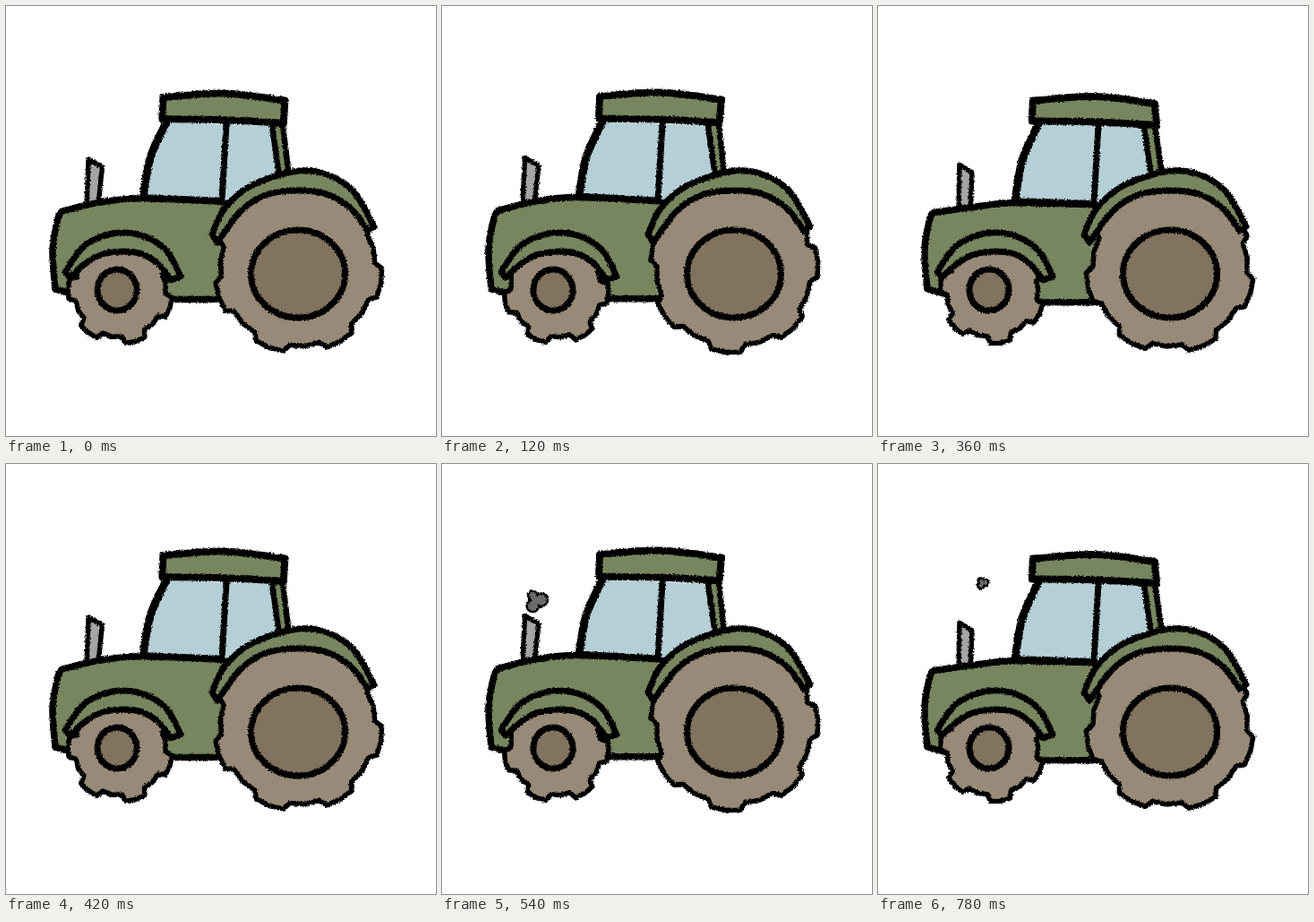
An HTML page for the animation above (0.84 s loop, 480 px wide and 480 px high).

```html
<!DOCTYPE html>
<html lang="en">
<head>
<meta charset="utf-8">
<title>Tractor</title>
<style>
  html, body { margin: 0; width: 100%; height: 100%; overflow: hidden; background: #fff; }
  svg { display: block; width: 100vw; height: 100vh; }
  path { stroke-linejoin: round; stroke-linecap: round; }
</style>
</head>
<body>
<svg viewBox="0 0 480 480">
  <filter id="rough" filterUnits="userSpaceOnUse" x="0" y="0" width="480" height="480" color-interpolation-filters="sRGB">
    <feTurbulence id="grain" type="fractalNoise" baseFrequency="0.55" numOctaves="2" seed="1"/>
    <feDisplacementMap in="SourceGraphic" scale="3.5" xChannelSelector="R" yChannelSelector="G"/>
  </filter>
  <g id="art" filter="url(#rough)"></g>
</svg>
<script>
const STEP = 60, STEPS = 14, POSES = 7, PUFF_START = 8;
const GREEN = '#78865f', GLASS = '#b6cfd7', TYRE = '#988a78', HUB = '#81735f', PIPE = '#a3a5a7', SMOKE = '#6a6a6a';

const shape = (d, fill = 'none', width = 7) =>
  `<path d="${d}" fill="${fill}" stroke="${width ? '#000' : 'none'}" stroke-width="${width}"/>`;
const disc = (x, y, rx, ry) => `M${x - rx},${y}a${rx},${ry} 0 1 0 ${2 * rx},0a${rx},${ry} 0 1 0 ${-2 * rx},0Z`;

// Smooth curve through points, continuing the current path.
function curve(pts) {
  let d = '' + pts[0];
  for (let i = 0; i < pts.length - 1; i++) {
    const p = pts[i - 1] || pts[i], a = pts[i], b = pts[i + 1], n = pts[i + 2] || b;
    d += `C${a[0] + (b[0] - p[0]) / 6},${a[1] + (b[1] - p[1]) / 6} ${b[0] - (n[0] - a[0]) / 6},${b[1] - (n[1] - a[1]) / 6} ${b}`;
  }
  return d;
}

// The body bounces once per wheel lug; `give` is how much a point follows it.
const bounce = pose => 2.5 - 6.5 * Math.cos((pose - 1.15) / POSES * 2 * Math.PI);

function body(bob) {
  const at = (x, y, give) => [x, y + bob * give];

  const lean = -bob * .4;
  const stack = shape(`M${at(90, 224, 1)}L${at(92 + lean / 2, 172, 1.1)}L${at(107 + lean, 180.5, 1.1)}L${at(103, 224, 1)}`, PIPE, 5.5);

  const hoodTop = [at(63, 229, .3), at(105, 220, 1), at(150, 215.5, .9), at(243, 219, .6)];
  const nose = [[55, 316], [52, 272], [58, 237], hoodTop[0]];
  const hood = shape(`M${curve(hoodTop)}L265,223L${at(265, 328, .6)}L${at(190, 328, .6)}L74,321L${curve(nose)}Z`, GREEN, 7.5);

  const frontTop = at(179, 130, .35), frontEnd = at(153, 214, .75);
  const midTop = at(246, 132, .2), midEnd = at(241, 218, .5);
  const rearTop = at(297, 134, .2), rearEnd = [305, 190];
  const backTop = at(309, 133, .2), backEnd = [316 + bob * .3, 190];
  const pillar = `M${curve([frontTop, at(161, 170, .5), frontEnd])}`;
  const cab = shape(`M${rearTop}L${backTop}L${backEnd}L${rearEnd}Z`, GREEN, 0) +
    shape(`${pillar}L${midEnd}L305,206L${rearEnd}L${rearTop}Z`, GLASS, 0) +
    shape(pillar, 'none', 9) +
    shape(`M${midTop}L${midEnd}L${frontEnd}`) +
    shape(`M${rearTop}L${rearEnd}M${backTop}L${backEnd}`, 'none', 6.5);

  const flare = bob * .45;
  const roofTop = [at(175 - flare, 102.5, .65), at(243, 98, .65), at(311 - flare, 106, .65)];
  const roofEdge = [at(310 + flare / 2, 131, .4), at(243, 127.5, .4), at(174 - flare, 126.5, .4)];
  const roof = shape(`M${curve(roofTop)}L${curve(roofEdge)}Z`, GREEN, 8);

  return stack + hood + cab + roof;
}

// Lugged tyre; the part under the fender is plain.
function wheel(cx, cy, base, tip, pitch, start) {
  const pts = [];
  for (let lug = start - 2 * pitch; lug < start + 360 - 2.5 * pitch; lug += pitch) {
    for (const [off, r] of [[-.28, base], [-.2, tip], [0, tip + .5], [.2, tip], [.28, base], [.5, base + 1]]) {
      const a = (lug + off * pitch) * Math.PI / 180;
      const reach = Math.sin(a) < -.45 ? tip : r;
      pts.push([cx + reach * Math.cos(a), cy + reach * Math.sin(a)]);
    }
  }
  return shape('M' + pts.join('L') + 'Z', TYRE, 5.5);
}

const fender = (outer, inner) => shape(`M${curve(outer)}L${curve(inner)}Z`, GREEN);

const rearFender = fender(
  [[230, 255], [244, 226], [273, 201], [320, 185], [355, 187], [387, 206], [411, 246]],
  [[404, 251], [385, 226], [358, 210], [325, 206], [290, 211], [262, 229], [236, 264]]);

const frontFender = fender(
  [[66, 297], [84, 271], [105, 258], [130, 253], [157, 258], [180, 274], [195, 302]],
  [[184, 306], [170, 288], [152, 277], [130, 274], [105, 278], [88, 288], [71, 303]]);

function puff(age) {
  if (age < 0) return '';
  const x = 103 + 2.8 * age, y = 133 + 28 * (1 - age / 5) ** 1.5;
  const size = Math.sin(Math.PI * (age + .7) / 6.4);
  const lobes = [[-6, -8, 5.5], [7, -2, 8], [-6, 7, 7.5], [-1, -1, 6]]
    .map(([u, v, r]) => disc(x + u * size, y + v * size, r * size, r * size)).join('');
  return shape(lobes, SMOKE, 5) + shape(lobes, SMOKE, 0);
}

function draw(step) {
  const pose = step % POSES, turn = pose / POSES;
  return puff(step - PUFF_START) + body(bounce(pose)) +
    wheel(326, 293, 86, 93.5, 50, 60 - turn * 50) +
    rearFender + shape(disc(326, 299, 52.5, 49), HUB) +
    wheel(127.5, 318.5, 50.5, 58, 55, 73 - turn * 55) +
    frontFender + shape(disc(124, 317, 22, 23), HUB);
}

const art = document.getElementById('art'), grain = document.getElementById('grain');
const origin = performance.now();
let shown = -1;

function tick(now) {
  const step = Math.floor(Math.max(0, now - origin) / STEP) % STEPS;
  if (step !== shown) {
    shown = step;
    grain.setAttribute('seed', step % POSES + 1);
    art.innerHTML = draw(step);
  }
  requestAnimationFrame(tick);
}
tick(origin);
</script>
</body>
</html>
```
